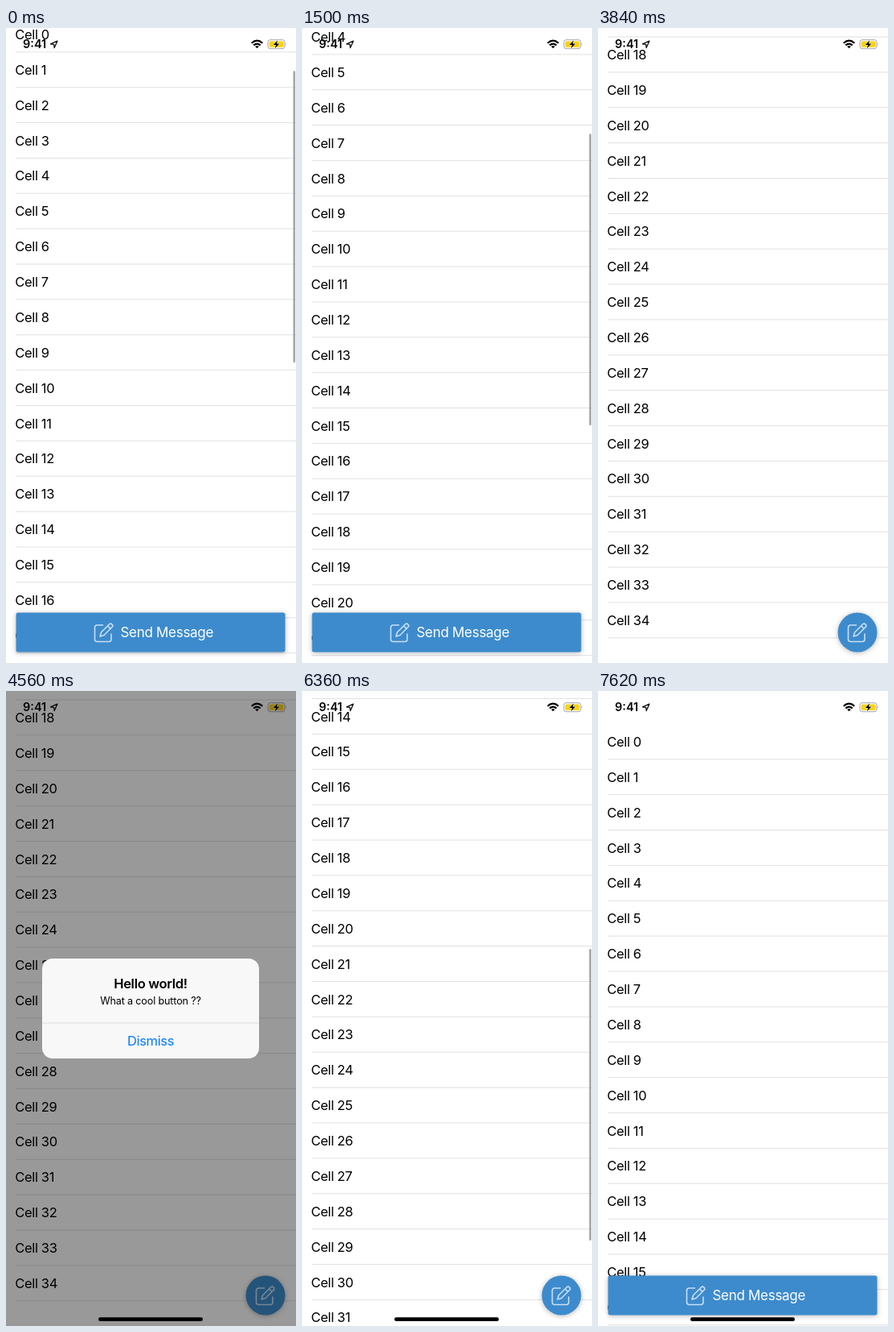
An HTML page that plays this animation: 361x788 px, repeating every 7680 ms.

```html
<!DOCTYPE html>
<html lang="en">
<head>
<meta charset="utf-8">
<title>Collapsing message button</title>
<style>
  html, body { margin: 0; width: 100%; height: 100%; overflow: hidden; background: #fff; }
  svg { display: block; width: 361px; height: 788px; }
  text { font-family: Inter, Roboto, "Liberation Sans", sans-serif; font-size: 16.5px; letter-spacing: -.35px; }
  .middle text { text-anchor: middle; }
  #separators path { stroke: #e1e1e4; }
  #button rect { fill: #3d8bcd; filter: drop-shadow(0 1px 3px rgba(0, 0, 0, .28)); }
  #icon { fill: none; stroke: #c8dff2; stroke-width: 1.6; stroke-linejoin: round; stroke-linecap: round; }
</style>
</head>
<body>
<svg viewBox="0 0 361 788">
  <rect width="361" height="788" fill="#fff"/>
  <g id="list"><g id="separators"></g><g id="labels"></g></g>
  <rect id="bar" x="357.5" width="2.6" rx="1.3" fill="#a6a6a6"/>

  <g id="button">
    <rect y="725.5" height="49"/>
    <g id="content">
      <g id="icon">
        <path d="M-1 -9H-8a3 3 0 0 0 -3 3V8.500a3 3 0 0 0 3 3H6.500a3 3 0 0 0 3 -3V2"/>
        <path d="M-4.500 5L-3 0L7.200 -10.200Q8.700 -11.700 10.200 -10.200Q12.200 -8.500 10.700 -6.700L.500 3.500ZM5 -8L8.600 -4.600"/>
      </g>
      <text id="caption" x="21" y="6.300" fill="#fff" style="font-size:17px;letter-spacing:-.3px">Send Message</text>
    </g>
  </g>

  <g id="status">
    <text x="21" y="25.300" style="font-size:14.5px;font-weight:600;letter-spacing:0">9:41</text>
    <path d="M64 16L55.500 19.900L59.700 20.400L60.200 24.600Z" fill="none" stroke="#000" stroke-width="1.200" stroke-linejoin="round"/>
    <g fill="none" stroke="#000" stroke-width="2.100">
      <path d="M305.700 18.700Q312.500 12.700 319.300 18.700"/>
      <path d="M308.200 21.400Q312.500 17.700 316.800 21.400"/>
    </g>
    <path d="M310.200 22.900Q312.500 21.100 314.800 22.900L312.500 25.300Z"/>
    <rect x="326" y="14.700" width="21" height="11" rx="3" fill="#fff" stroke="#a5a5a5"/>
    <path d="M348.300 18.300q1.600 1.900 0 3.800z" fill="#a5a5a5"/>
    <rect x="327.700" y="16.400" width="17.600" height="7.600" rx="1.600" fill="#fbd20c"/>
    <path d="M338 15.200L332.800 20.900H336L335 25.300L340.300 19.400H337Z" stroke="#fff" stroke-width="1" paint-order="stroke"/>
  </g>

  <rect id="dim" width="361" height="788"/>
  <g id="alert" class="middle">
    <rect x="45" y="332" width="270" height="124" rx="13" fill="#f8f8f8"/>
    <path d="M45 412H315" stroke="#d2d2d6" stroke-width=".7"/>
    <text x="180" y="368.800" style="font-weight:600;letter-spacing:-.3px">Hello world!</text>
    <text x="180" y="388.500" style="font-size:12.600px;letter-spacing:-.15px">What a cool button ??</text>
    <text x="180" y="440" fill="#007aff">Dismiss</text>
  </g>
  <rect id="home" x="115" y="777.300" width="130" height="4.800" rx="2.400"/>
</svg>
<script>
const LOOP = 7680, STEP = 60;
const PITCH = 43.87, TOP = 63, BOTTOM = -756.6;
const $ = id => document.getElementById(id);
const set = (el, attrs) => { for (const k in attrs) el.setAttribute(k, attrs[k]); };
const clamp = x => Math.min(1, Math.max(0, x));
const ramp = (t, start, length) => clamp((t - start) / length);
const smooth = x => x * x * (3 - 2 * x);
const easeOut = x => 1 - (1 - x) ** 2;
const mix = (a, b, p) => a + (b - a) * p;

// [time, centre of the first row]
const scrollKeys = [
  [0, 8], [240, -60], [500, -104], [780, -131.5], [1100, -149], [1440, -158],
  [1560, -178], [1800, -400], [2100, -740], [2220, -818], [2280, -822],
  [2400, -795], [2640, -760], [2820, BOTTOM], [6150, BOTTOM], [6240, -740],
  [6420, -470], [6670, TOP], [6780, 103], [6840, 94], [6960, 70],
  [7080, 64], [7200, TOP], [LOOP, TOP]
];

const slope = i => {
  const k = scrollKeys;
  if (i < 0 || i >= k.length - 1) return 0;
  return (k[i + 1][1] - k[i][1]) / (k[i + 1][0] - k[i][0]);
};
const tangent = i => {
  if (i === 0) return -.35;
  const a = slope(i - 1), b = slope(i);
  return a * b > 0 ? 2 * a * b / (a + b) : 0;
};

// Monotone cubic through the scroll keys
function scrollAt(t) {
  let i = 0;
  while (i < scrollKeys.length - 2 && t >= scrollKeys[i + 1][0]) i++;
  const [t0, y0] = scrollKeys[i], [t1, y1] = scrollKeys[i + 1];
  const h = t1 - t0, u = (t - t0) / h, v = 1 - u;
  return mix(y0, y1, smooth(u)) + h * u * v * (v * tangent(i) - u * tangent(i + 1));
}

for (let i = 0; i < 35; i++) {
  const y = i * PITCH;
  $('separators').insertAdjacentHTML('beforeend', `<path d="M12 ${y + 21.8}H361"/>`);
  $('labels').insertAdjacentHTML('beforeend', `<text x="11.300" y="${y + 6}">Cell ${i}</text>`);
}

function drawList(t) {
  const y = scrollAt(t);
  set($('list'), { transform: `translate(0 ${y})` });

  const above = Math.max(0, y - TOP), below = Math.max(0, BOTTOM - y);
  const height = 362 - 1.06 * (above + below);
  const inside = Math.min(TOP, Math.max(BOTTOM, y));
  const top = below ? 759 - height : 28.5 + (TOP - inside) * .4515;
  const opacity = t < 4000 ? 1 - ramp(t, 2820, 240)
                           : ramp(t, 6150, 60) * (1 - ramp(t, 7200, 260));
  set($('bar'), { y: top, height, opacity });
}

function drawButton(t) {
  const p = smooth(ramp(t, 2060, 270)) - smooth(ramp(t, 6400, 270));
  const width = mix(335, 49, p);
  set($('button').firstElementChild, { x: 347.5 - width, width, rx: mix(2.5, 24.5, p) });
  set($('content'), { transform: `translate(${mix(121.5, 322.5, p)} 750)` });
  set($('caption'), { opacity: clamp(1 - 3 * p) });
}

function drawAlert(t) {
  const shown = easeOut(ramp(t, 3840, 360));
  const alpha = shown - easeOut(ramp(t, 5080, 360));
  const scale = mix(1.18, 1, shown);
  set($('dim'), { opacity: .4 * alpha });
  set($('alert'), {
    opacity: alpha,
    transform: `translate(180 394) scale(${scale}) translate(-180 -394)`
  });
  set($('home'), { opacity: ramp(t, 3840, 240) });
}

function draw(now) {
  const t = Math.floor(now % LOOP / STEP) * STEP;
  drawList(t);
  drawButton(t);
  drawAlert(t);
}

let start;
function tick(now) {
  start ??= now;
  draw(now - start);
  requestAnimationFrame(tick);
}
draw(0);
requestAnimationFrame(tick);
</script>
</body>
</html>
```
